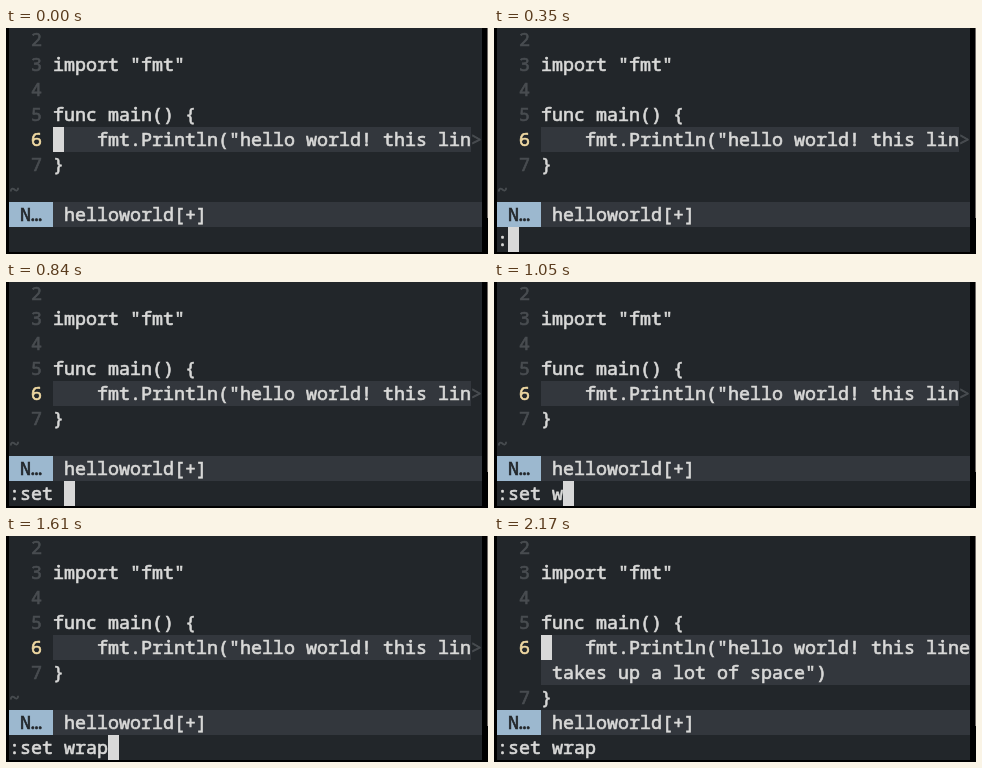
Animation of 482 by 226 pixels, one loop 2310 ms. Source, as an HTML page:

```html
<!DOCTYPE html>
<html lang="en">
<head>
<meta charset="utf-8">
<title>Vim wrap</title>
<style>
html, body { margin: 0; width: 482px; height: 226px; overflow: hidden; background: #000; }
svg { display: block; }
text {
  font: 500 18.333px "Noto Sans Mono", "DejaVu Sans Mono", monospace;
  stroke-width: .65px;
  white-space: pre;
}
</style>
</head>
<body>
<svg id="screen" width="482" height="226"></svg>
<script>
const COL = 11, ROW = 25, LEFT = 3, TOP = -1, LOOP = 2310;
const BG = '#22262a', BAR = '#33373d', FG = '#d9d9d8', DIM = '#494d51';
const GOLD = '#f2dba4', MODE = '#9cb8cf', CURSOR = '#d8d8d8', EDGE = '#6e6864';
const screen = document.getElementById('screen');

// Command line contents and the times at which they appear
const typed = [
  [210, ':'], [490, ':s'], [560, ':se'], [630, ':set'], [770, ':set '],
  [910, ':set w'], [1190, ':set wr'], [1330, ':set wra'], [1470, ':set wrap']
];
const ENTER = 1750;

const x = col => LEFT + col * COL;
const y = row => TOP + row * ROW;
const escape = s => s.replace(/&/g, '&amp;').replace(/</g, '&lt;').replace(/>/g, '&gt;');
const rect = (x, y, w, h, fill) =>
  `<rect x="${x}" y="${y}" width="${w}" height="${h}" fill="${fill}"/>`;
const box = (col, row, cols, fill) => rect(x(col), y(row), cols * COL, ROW, fill);
const text = (col, row, str, fill = FG) =>
  `<text x="${x(col)}" y="${y(row) + 19}" fill="${fill}" stroke="${fill}">${escape(str)}</text>`;
const number = (row, n, fill = DIM) => text(2, row, String(n), fill);
const cursor = (col, row) => box(col, row, 1, CURSOR);

function draw(command, wrapped) {
  const last = wrapped ? 6 : 5;
  let out = rect(LEFT, 0, 43 * COL, 224, BG) + rect(481, 0, 1, 190, EDGE);
  out += number(0, 2) + number(1, 3) + text(4, 1, 'import "fmt"') + number(2, 4);
  out += number(3, 5) + text(4, 3, 'func main() {');

  out += box(4, 4, wrapped ? 39 : 38, BAR) + number(4, 6, GOLD);
  out += text(8, 4, 'fmt.Println("hello world! this lin' + (wrapped ? 'e' : ''));
  if (wrapped) out += box(4, 5, 39, BAR) + text(4, 5, ' takes up a lot of space")');
  else out += text(42, 4, '>', DIM) + text(0, 6, '~', DIM);
  out += number(last, 7) + text(4, last, '}');

  out += box(4, 7, 39, BAR) + box(0, 7, 4, MODE);
  out += text(1, 7, 'N…', BG) + text(5, 7, 'helloworld[+]');
  out += text(0, 8, command);
  out += command && !wrapped ? cursor(command.length, 8) : cursor(4, 4);
  screen.innerHTML = out;
}

let shown;
function frame() {
  const t = performance.now() % LOOP;
  const step = typed.filter(([start]) => t >= start).pop();
  const command = step ? step[1] : '';
  const wrapped = t >= ENTER;
  const key = command + wrapped;
  if (key !== shown) draw(command, wrapped);
  shown = key;
  requestAnimationFrame(frame);
}
frame();
</script>
</body>
</html>
```
